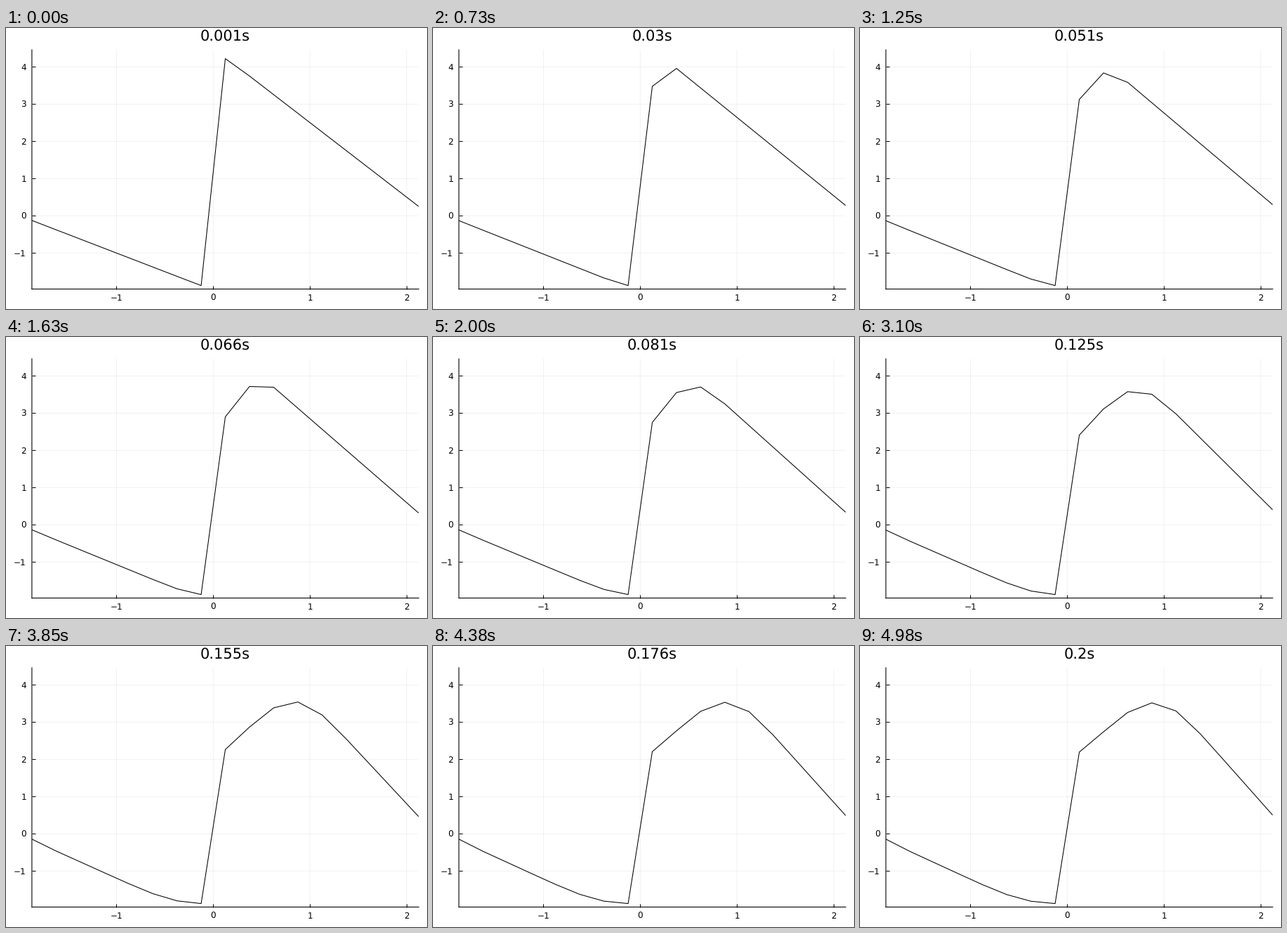
Write a matplotlib script that moves like this. It is 600 px wide and 400 px high and loops after 5.01 s.

```python
import numpy as np
import matplotlib.pyplot as plt
from matplotlib.animation import FuncAnimation

plt.rcParams["font.family"] = "DejaVu Sans"
plt.rcParams["text.hinting"] = "none"

W, H, DPI = 600, 400, 100
PX = 72 / DPI           # one pixel in points
LEFT, RIGHT, TOP, BOTTOM = 36.9, 588.2, 31.0, 371.6
STATES = 200            # distinct pictures per loop
TICK_MS = 10
LOOP_MS = 5010

# Burgers equation on a ring of upwind cells, step limited by the peak speed
CELL = 0.25
T_END = 0.17
x = np.linspace(-1.875, 2.125, 17)


def rate(u):
    right = np.roll(u, -1)
    flux = np.where(u + right > 0, u, right) ** 2 / 2
    return (np.roll(flux, 1) - flux) / CELL


def solve(u):
    steps, t = [u], 0.0
    while t < T_END - 1e-9:
        dt = min(0.5 * CELL / np.abs(u).max(), T_END - t)
        u = u + dt * rate(u)
        steps.append(u)
        t += dt
    return np.array(steps)


start = np.where(x < 0, -2 - x, 4.5 - 2 * x)
steps = solve(start)


def profile(k):
    pos = (k + 1) / STATES * (len(steps) - 1)
    i = min(int(pos), len(steps) - 2)
    return steps[i] + (pos - i) * (steps[i + 1] - steps[i])


fig = plt.figure(figsize=(W / DPI, H / DPI), dpi=DPI, facecolor="white")
ax = fig.add_axes([LEFT / W, 1 - BOTTOM / H,
                   (RIGHT - LEFT) / W, (BOTTOM - TOP) / H])
xlim = (x[0], x[-1])
ylim = (1.05 * start.min(), 1.05 * start.max())
xticks, yticks = range(-1, 3), range(-1, 5)
ax.set(xlim=xlim, ylim=ylim, xticks=xticks, yticks=yticks)
ax.spines[["top", "right"]].set_visible(False)
for side in ("left", "bottom"):
    ax.spines[side].set(linewidth=1.1 * PX, snap=False)
ax.tick_params(direction="in", length=5 * PX, width=PX,
               labelbottom=False, labelleft=False)
ax.set_axisbelow(True)
ax.grid(color="black", alpha=0.055, linewidth=PX, snap=False)


def label(px, py, text, size, ha):
    return fig.text(px / W, 1 - py / H, text, fontsize=size * PX,
                    ha=ha, va="baseline")


def number(v):
    return str(v).replace("-", "\u2212")


for v in xticks:
    px = LEFT + (v - xlim[0]) / (xlim[1] - xlim[0]) * (RIGHT - LEFT)
    label(px, 387.7, number(v), 12, "center")
for v in yticks:
    py = BOTTOM - (v - ylim[0]) / (ylim[1] - ylim[0]) * (BOTTOM - TOP)
    label(28.9, py + 4.4, number(v), 12, "right")

title = label((LEFT + RIGHT) / 2, 18.2, "", 21, "center")
curve, = ax.plot(x, start, color="black", linewidth=1.05 * PX)


def draw(n):
    # pictures alternate between 30 ms and 20 ms
    k = min(2 * (n // 5) + (n % 5 >= 3), STATES - 1)
    curve.set_ydata(profile(k))
    title.set_text(f"{(k + 1) / 1000:g}s")
    return curve, title


anim = FuncAnimation(fig, draw, frames=LOOP_MS // TICK_MS, interval=TICK_MS,
                     init_func=lambda: draw(0), repeat=True, repeat_delay=0)
plt.show()
```
